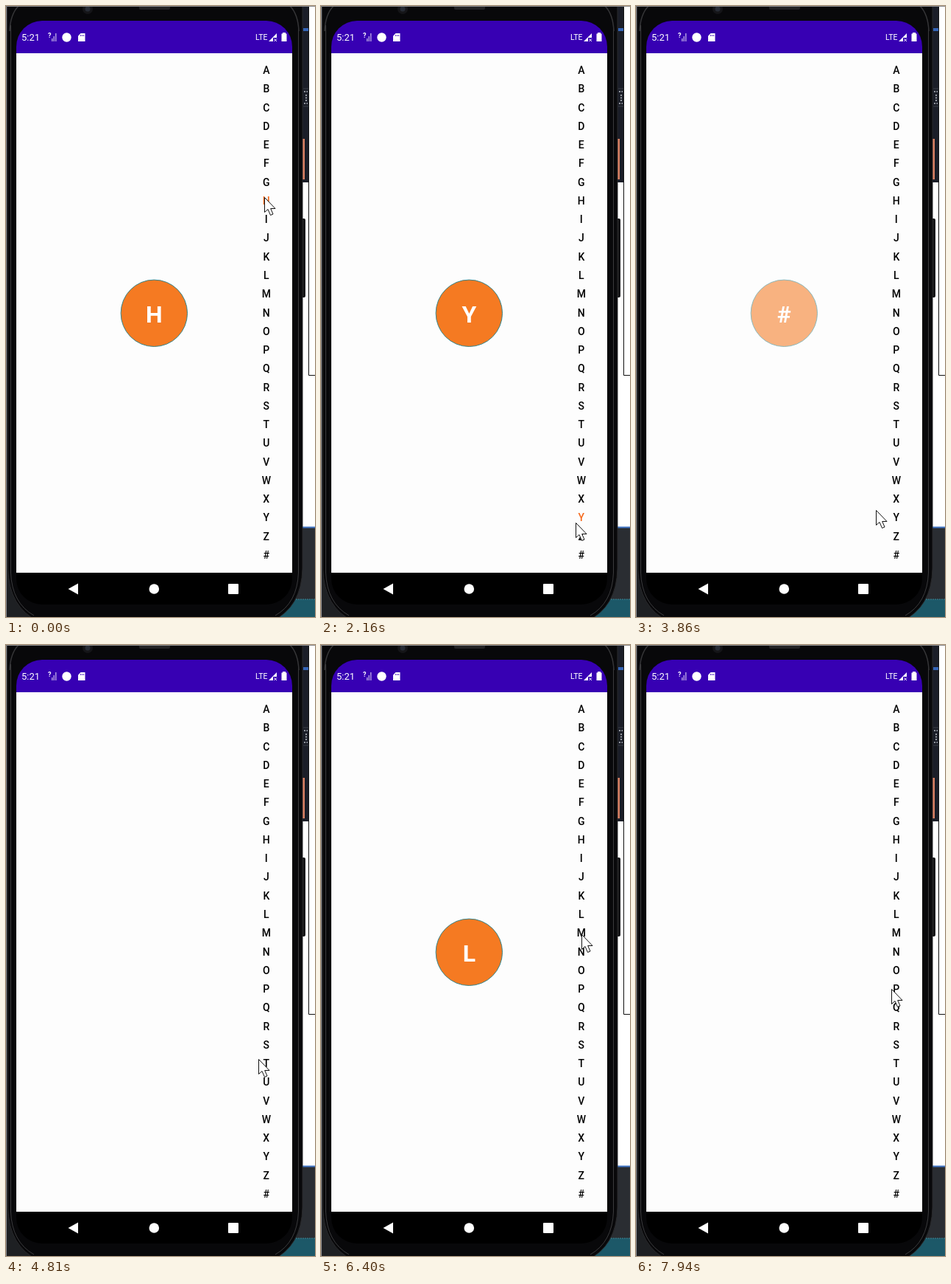
Write an HTML page that moves like this. It is 420 by 828 pixels and loops after 8000 ms.

```html
<!DOCTYPE html>
<html lang="en">
<head>
<meta charset="utf-8">
<title>Alphabet side bar</title>
<style>
  html, body { margin: 0; width: 100%; height: 100%; overflow: hidden; background: #fff; }
  svg { display: block; }
  text { font-family: Roboto, sans-serif; }
  #index { font-size: 14px; font-weight: 500; text-anchor: middle; }
  #letter { font-size: 32px; font-weight: 700; text-anchor: middle; fill: #fff; }
</style>
</head>
<body>
<svg width="420" height="828" viewBox="0 0 420 828">
  <defs>
    <clipPath id="screen"><rect x="14" y="20" width="375" height="791" rx="35"/></clipPath>
  </defs>

  <!-- desktop behind the phone -->
  <rect width="420" height="828" fill="#fff"/>
  <rect width="60" height="828" fill="#1e2023"/>
  <rect x="400" width="11" height="239" fill="#1b1e28"/>
  <path d="M404 32h7" stroke="#3465b8" stroke-width="4"/>
  <path d="M404 112h7M404 136h7" stroke="#3c4048"/>
  <path d="M405 116h5M405 132h5M408 120v9" stroke="#b9bdc4" stroke-width="1.6" stroke-dasharray="2 1.5"/>
  <rect x="402" y="180" width="4" height="55" fill="#dc8264"/>
  <path d="M411.5 0V500.5H420" fill="none" stroke="#111"/>
  <rect x="340" y="706" width="80" height="98" fill="#2a2d32"/>
  <path d="M400 706.5h20" stroke="#3f74c4" stroke-width="2"/>
  <rect x="340" y="804" width="80" height="24" fill="#1c5868"/>
  <path d="M340 804h80" stroke="#3f8494" stroke-dasharray="2 1"/>

  <!-- phone body -->
  <rect x="401" y="288" width="6" height="107" rx="2" fill="#18181a"/>
  <path d="M1.5 0H403V762Q402 815 361 834H44Q4 815 2.5 762Z" fill="#08080a" stroke="#29292b"/>
  <path d="M6.5 26V768Q8 809 38 826M397.5 26V768Q396 809 366 826" fill="none" stroke="#3b3b3d"/>
  <path d="M5 34Q6 11 17 0M398 34Q397 11 386 0" fill="none" stroke="#353537" stroke-width="1.5"/>
  <circle cx="111" cy="4" r="7" fill="#151518"/>
  <circle cx="111" cy="4" r="3.5" fill="#262b35"/>
  <rect x="181" y="-3" width="42" height="8" rx="2" fill="#222224"/>
  <path d="M.5 828V.5H420" fill="none" stroke="#8b8b8d"/>

  <!-- screen -->
  <g clip-path="url(#screen)">
    <rect x="14" y="20" width="375" height="791" fill="#000"/>
    <rect x="14" y="20" width="375" height="44" fill="#3700b3"/>
    <rect x="14" y="64" width="375" height="704" fill="#fdfdfd"/>
  </g>
  <g fill="#fff">
    <text x="21" y="47" font-size="13">5:21</text>
    <text x="57" y="43" font-size="9" font-weight="700">?</text>
    <path d="M62 44h1.500v4H62zM64.500 41H66v7h-1.500zM67 37h1.500v11H67z" opacity=".6"/>
    <circle cx="82.500" cy="42.500" r="6.200"/>
    <path d="M101.500 37H107.500V48H98V40.500Z"/>
    <path d="M101.500 39v2M103.500 39v2M105.500 39v2" stroke="#3700b3" stroke-width=".8"/>
    <text x="339" y="46" font-size="10.500">LTE</text>
    <path d="M357 48L368 37V43H363V48Z"/>
    <path d="M364.500 44.500l3.500 3.500m0-3.500l-3.500 3.500" stroke="#fff"/>
    <path d="M376 36h4v1.500h1.500V48h-7V37.500H376z"/>
    <path d="M84.500 790L98 782.500V797.500Z"/>
    <circle cx="201.300" cy="790" r="6.800"/>
    <rect x="302" y="783" width="14" height="14" rx="1"/>
  </g>

  <g id="index"></g>
  <g id="bubble">
    <circle cx="201.300" cy="416.300" r="45.200" fill="#f57a22" stroke="#35868d"/>
    <text id="letter" x="201.300" y="429"></text>
  </g>
  <path id="cursor" d="M.5 .5V20.500L5 16.500L8.500 24.500L12 23L8.700 15.500H15Z" fill="#fff" stroke="#111"/>
</svg>

<script>
const LOOP = 8000, STEP = 120, ROW = 25.27, FADE_DELAY = 600, FADE = 300;
const CHARS = "ABCDEFGHIJKLMNOPQRSTUVWXYZ#";
const $ = id => document.getElementById(id);

const linear = k => k, easeIn = k => k * k, easeOut = k => k * (2 - k);

// Pointer key poses: time, x, y, easing towards the next pose
const path = [
  [0, 351, 259], [1200, 357, 481], [1620, 344, 599, easeOut], [2910, 347, 766],
  [3410, 339, 713], [3710, 326, 683], [4690, 326, 683], [4810, 343, 561],
  [5530, 344, 363], [5890, 351, 366, easeIn], [6640, 358, 429], [6940, 346, 446],
  [7540, 348, 473], [7940, 347, 466], [LOOP, 347, 466]
];
const touches = [{ down: 0, up: 3100 }, { down: 6010, up: 6300 }];

const labels = [...CHARS].map((c, i) => {
  const label = document.createElementNS("http://www.w3.org/2000/svg", "text");
  label.textContent = c;
  label.setAttribute("x", 353.8);
  label.setAttribute("y", 92 + i * ROW);
  return $("index").appendChild(label);
});

// The picture updates in steps counted from the last key pose
function pose(time) {
  const i = path.findLastIndex(p => p[0] <= time);
  const [t0, x0, y0, ease = linear] = path[i];
  const [t1, x1, y1] = path[i + 1];
  const t = t0 + Math.floor((time - t0) / STEP) * STEP;
  const k = ease((t - t0) / (t1 - t0));
  return { t, x: Math.round(x0 + (x1 - x0) * k), y: Math.round(y0 + (y1 - y0) * k) };
}

function draw(time) {
  const { t, x, y } = pose(time);
  const { up } = touches.findLast(touch => touch.down <= t);
  const touchY = pose(Math.min(time, up)).y;
  const picked = Math.min(CHARS.length - 1, Math.floor((touchY - 80) / ROW));
  const alpha = 1 - (t - up - FADE_DELAY) / FADE;

  $("letter").textContent = CHARS[picked];
  $("bubble").setAttribute("opacity", Math.max(0, Math.min(1, alpha)));
  labels.forEach((label, i) =>
    label.setAttribute("fill", t < up && i === picked ? "#f5691c" : "#000"));
  $("cursor").setAttribute("transform", `translate(${x} ${y})`);
}

const begin = performance.now();
(function frame() {
  draw((performance.now() - begin) % LOOP);
  requestAnimationFrame(frame);
})();
</script>
</body>
</html>
```
